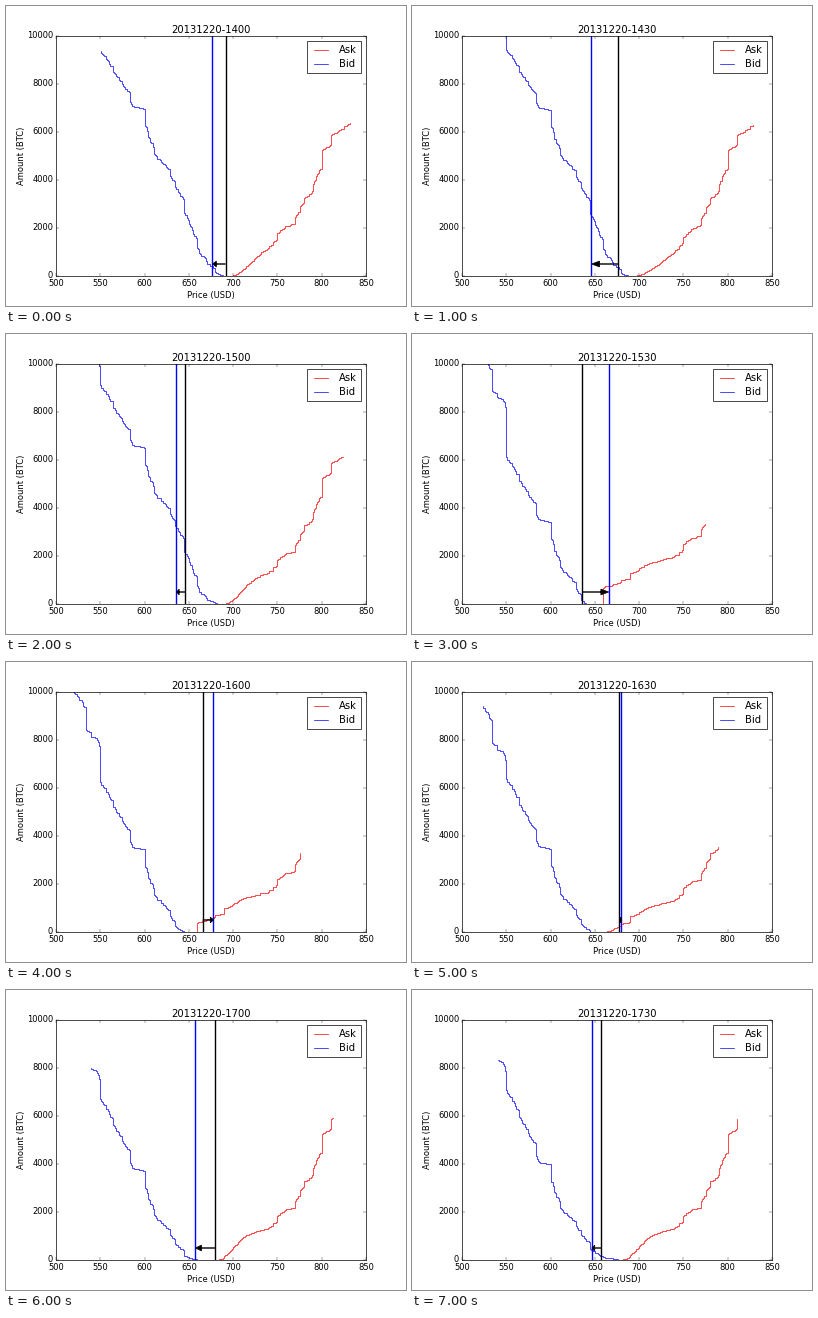
Animation of 400x300 px, one loop 8 s. Source, as a matplotlib script:

```python
import numpy as np
import matplotlib.pyplot as plt
from matplotlib.animation import FuncAnimation

plt.style.use("classic")
plt.rcParams["font.family"] = "DejaVu Sans"

fig = plt.figure(figsize=(8, 6), dpi=50, facecolor="white")
ax = fig.add_subplot()

# Order volume per price level; round prices attract larger orders.
rng = np.random.default_rng(4)
LEVELS = np.arange(500, 851)
VOLUME = 0.05 + rng.random(LEVELS.size) ** 3
VOLUME[LEVELS % 5 == 0] *= 4
TOTAL = np.cumsum(VOLUME)


def stairs(points):
    """Fill the gaps between (price, amount) points with uneven steps."""
    price, amount = np.array(points).T
    return np.interp(TOTAL, np.interp(price, LEVELS, TOTAL), amount)


# The standing book that every snapshot is derived from.
BIDS = stairs([(510, 11600), (524, 11050), (533, 10600), (535, 9800),
               (550, 9250), (570, 8200), (583, 7600), (589, 7000),
               (600, 6920), (601, 6330), (612, 5040), (631, 4050),
               (647, 2500), (665, 800), (672, 460), (688, 0)])
ASKS = stairs([(656, 0), (689, 400), (690, 650), (715, 1100), (737, 1290),
               (749, 1600), (750, 1850), (760, 2110), (769, 2180),
               (770, 2470), (789, 3550), (799, 4450), (800, 5250),
               (809, 5450), (810, 5830), (834, 6450)])

START = 691.5
# price, best bid, best ask, bids sold into, bid refill, ask gap, extra orders
STATES = [
    (676.6, 688, 694, -50, 30, 31, 0),
    (646.2, 687, 690, 0, 30, 42, 0),
    (636.0, 682, 687, 400, 200, 25, 0),
    (665.7, 640, 645, 3500, 120, 10, 650),
    (677.8, 647, 647, 3480, 200, 10, 350),
    (679.9, 655, 658, 3450, 300, 10, 0),
    (657.5, 675, 678, 3200, 600, 22, 0),
    (646.6, 676, 676, 2950, 900, 22, 0),
]


def bid_curve(i):
    _, best, _, sold, refill, _, extra = STATES[i]
    growth = 0.03 + 0.045 * i
    amount = BIDS + growth * np.maximum(BIDS - 7000, 0) - sold
    amount += (LEVELS <= 550) * (800 + 2 * extra)
    amount = refill * np.logaddexp(0, amount / refill)
    shown = (LEVELS >= 0.8 * best) & (LEVELS <= best)
    return LEVELS[shown], amount[shown]


def ask_curve(i):
    _, _, best, _, _, gap, extra = STATES[i]
    amount = ASKS * (1 - np.exp(-((LEVELS - best) / gap) ** 2))
    amount += (LEVELS >= 659) * extra
    shown = (LEVELS >= best) & (LEVELS <= 1.2 * best)
    return LEVELS[shown], amount[shown]


def draw(i):
    before = STATES[i - 1][0] if i else START
    after = STATES[i][0]
    move = after - before
    clock = f"{14 + i // 2}{i % 2 * 30:02d}"

    ax.clear()
    ax.plot(*ask_curve(i), "r", drawstyle="steps-post", label="Ask")
    ax.plot(*bid_curve(i), "b", drawstyle="steps-pre", label="Bid")
    ax.axvline(before, color="k", lw=2)
    ax.axvline(after, color="b", lw=2)
    ax.arrow(before, 500, move, 0, head_width=240, head_length=0.3 * abs(move),
             length_includes_head=True, color="k", lw=1, zorder=3)
    ax.set(xlim=(500, 850), ylim=(0, 10000), title="20131220-" + clock)
    ax.set_xlabel("Price (USD)")
    ax.set_ylabel("Amount (BTC)", labelpad=2)
    ax.legend(loc="upper right", labelspacing=0.4)


anim = FuncAnimation(fig, draw, frames=len(STATES), interval=1000, repeat=True)
plt.show()
```
